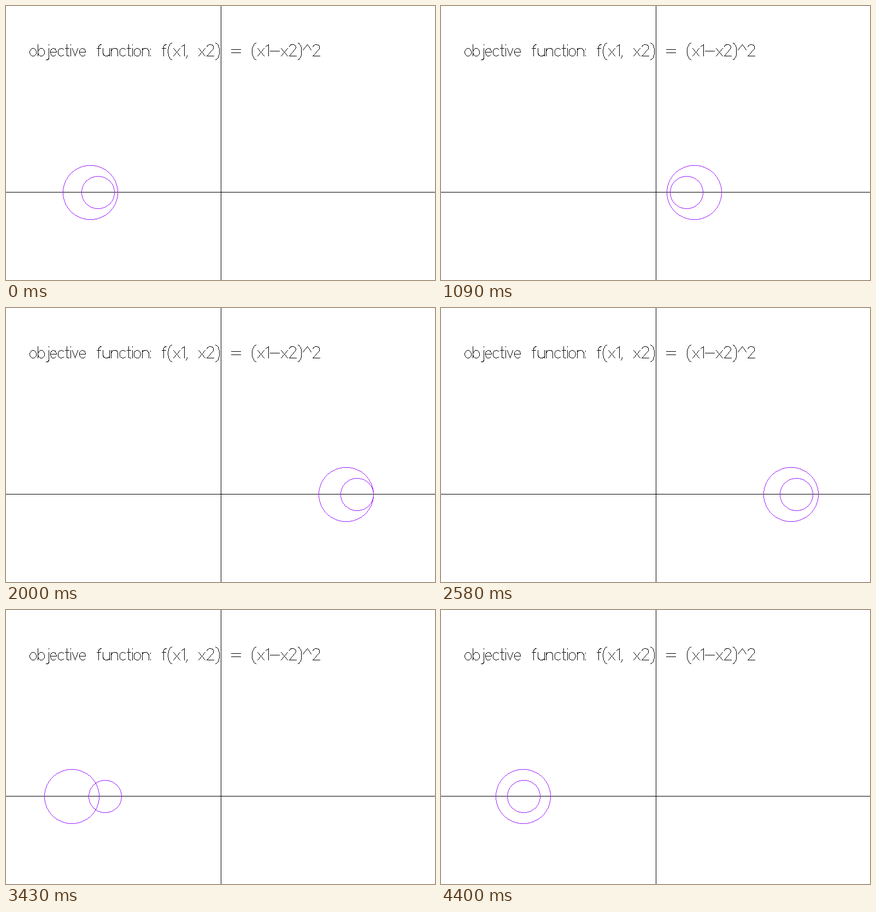
A matplotlib script that plays this animation: 785x501 px, repeating every 4440 ms.

```python
import numpy as np
import matplotlib.pyplot as plt
from matplotlib.animation import FuncAnimation

W, H, DPI = 785, 501, 64
LOOP, STEP = 4440, 10
BLACK, PURPLE = (0, 0, 0), (160, 32, 255)
AXIS_X, AXIS_Y = 393, 340
RING_Y = AXIS_Y + 0.5
TEXT = "objective function: f(x1, x2) = (x1-x2)^2"
TEXT_X, BASELINE, GAP, SPACE = 43, 91, 3, 18.5
TALL, LOW = 21, 14  # heights of capitals and small letters


# ---- stroke lettering in pixels, y up from the baseline ----
def arc(cx, cy, rx, ry, a0, a1):
    a = np.radians(np.linspace(a0, a1, 25))
    return list(zip(cx + rx * np.cos(a), cy + ry * np.sin(a)))


def stem(x, top, bottom=0):
    return [(x, top), (x, bottom)]


def bar(y, length):
    return [(0, y), (length, y)]


def dot(y):
    return stem(0, y + 1, y)


bowl = arc(6, 7, 6, 7, 0, 360)
bracket = arc(9, 8.5, 9, 16, 105, 255)

GLYPHS = {
    "o": [bowl],
    "b": [stem(0, TALL), bowl],
    "j": [[(5, LOW)] + arc(1, -4, 4, 3, 0, -100), stem(5, 21, 20)],
    "e": [bar(7, 11) + arc(5.5, 7, 5.5, 7, 0, 318)],
    "c": [arc(6, 7, 6, 7, 45, 315)],
    "t": [[(3, TALL)] + arc(7, 3, 4, 3, 180, 270), bar(LOW, 7)],
    "i": [stem(0, LOW), dot(20)],
    "v": [[(0, LOW), (5, 0), (10, LOW)]],
    "f": [arc(8, 17, 5, 4, 90, 180) + [(3, 0)], bar(LOW, 7)],
    "u": [[(0, LOW)] + arc(6, 5, 6, 5, 180, 360), stem(12, LOW)],
    "n": [stem(0, LOW), arc(6, 9, 6, 5, 180, 0) + [(12, 0)]],
    ":": [dot(12), dot(0)],
    ",": [[(2, 1), (2, -1), (0, -4)]],
    "(": [bracket],
    ")": [[(-x, y) for x, y in bracket]],
    "x": [[(0, LOW), (12, 0)], [(0, 0), (12, LOW)]],
    "1": [[(0, 17), (5, TALL), (5, 0)]],
    "2": [arc(6, 16, 6, 5, 170, -30) + bar(0, 13)],
    "=": [bar(12, 17), bar(6, 17)],
    "-": [bar(9, 17)],
    "^": [[(0, 11), (7.5, TALL), (15, 11)]],
}


def stroke(img, pts):
    """One pixel wide polyline without smoothing."""
    pts = np.floor(np.array(pts) + 0.5)
    for p, q in zip(pts[:-1], pts[1:]):
        n = int(np.abs(q - p).max()) + 1
        x, y = np.floor(np.linspace(p, q, n) + 0.5).astype(int).T
        img[y, x] = BLACK


def write(img, pen, text):
    """Set glyphs side by side with an even gap between their ink."""
    for ch in text:
        if ch == " ":
            pen += SPACE
            continue
        xs = [x for s in GLYPHS[ch] for x, _ in s]
        left = min(xs)
        for s in GLYPHS[ch]:
            stroke(img, [(pen + x - left, BASELINE - y) for x, y in s])
        pen += max(xs) - left + GAP


def ring(img, cx, r):
    """One pixel wide outline, half a pixel flatter than wide."""
    a, b = r, r - 0.5
    diag = np.hypot(a, b)
    u, v = np.arange(-a, a + 1), np.arange(-b, b + 1)
    u, v = u[abs(u) <= a * a / diag], v[abs(v) <= b * b / diag]
    x = a * np.sqrt(1 - (v / b) ** 2)
    y = b * np.sqrt(1 - (u / a) ** 2)
    px = np.rint(cx + np.concatenate([u, u, x, -x])).astype(int)
    py = np.rint(RING_Y + np.concatenate([y, -y, v, v])).astype(int)
    ok = (px >= 0) & (px < W)
    img[py[ok], px[ok]] = PURPLE


# ---- gradient descent: the gap shrinks by DECAY at every update ----
RATE = 17.5 / 1000  # updates per ms
DECAY = 0.77
STARTS = [(0, 154, 168), (9, 547, 366), (26, 531, 734),
          (40, 628, 663), (55, 40, 262)]  # (update, x1, x2)


def state(k):
    k0, x1, x2 = [s for s in STARTS if s[0] <= k][-1]
    mid, half = (x1 + x2) / 2, (x2 - x1) / 2 * DECAY ** (k - k0)
    return np.floor(mid - half), np.floor(mid + half)


# ---- stage ----
stage = np.full((H, W, 3), 255, np.uint8)
stage[AXIS_Y, :] = BLACK
stage[:, AXIS_X] = BLACK
write(stage, TEXT_X, TEXT)

fig = plt.figure(figsize=(W / DPI, H / DPI), dpi=DPI, facecolor="white")
picture = fig.figimage(stage, 0, 0, origin="upper")


def draw(n):
    x1, x2 = state(int(n * STEP * RATE + 1e-9))
    img = stage.copy()
    ring(img, x1, 50)
    ring(img, x2, 30)
    picture.set_data(img)
    return [picture]


anim = FuncAnimation(fig, draw, frames=LOOP // STEP, interval=STEP,
                     repeat=True, repeat_delay=0, blit=False)
plt.show()
```
